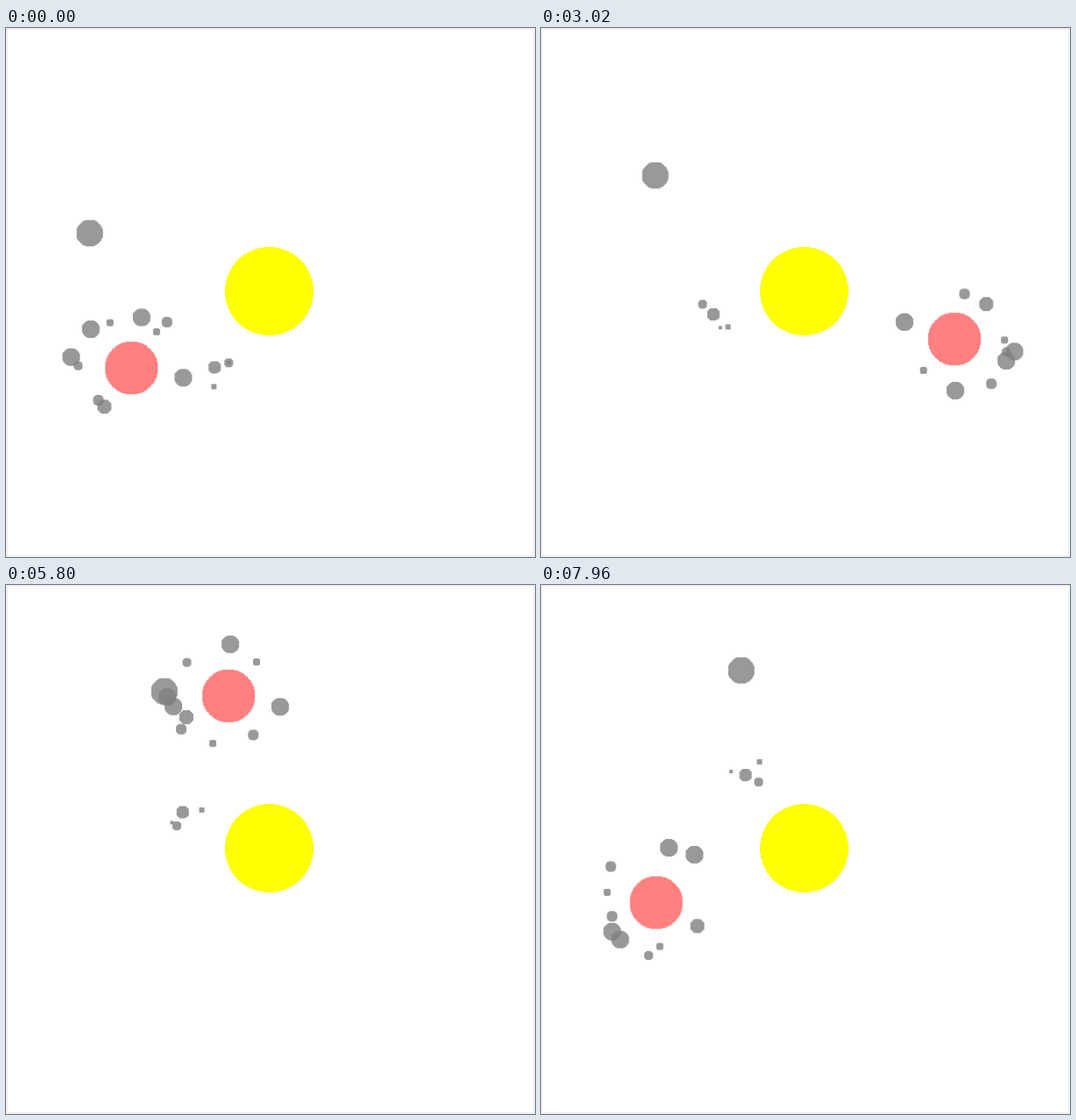
Recreate the animation shown at these times as an HTML page without scripts. Size 604x604 px, loop 7.99 s.

```html
<!DOCTYPE html>
<html lang="en">
<head>
<meta charset="utf-8">
<title>Orbits</title>
<style>
  html, body { margin: 0; width: 100%; height: 100%; overflow: hidden; background: #fff; }
  svg { display: block; width: 100%; height: 100%; shape-rendering: crispEdges; }

  /* --r orbit radius, --a start angle, --w turn in degrees per second */
  .orbit { animation: orbit 7.99s linear infinite; }
  @keyframes orbit {
    from {
      transform: rotate(var(--a)) translateX(var(--r)) rotate(calc(-1 * var(--a)));
    }
    to {
      transform: rotate(calc(var(--a) + 7.99 * var(--w))) translateX(var(--r))
                 rotate(calc(-1 * var(--a) - 7.99 * var(--w)));
    }
  }

  .rock { fill: #808080; fill-opacity: .8; }
  .planet { fill: #ff8080; }
  .sun { fill: #ff0; }
  .edge { fill: none; stroke: #f0f0f0; stroke-width: 2; }
</style>
</head>
<body>
<svg viewBox="0 0 604 604">
  <rect class="edge" x="1" y="1" width="602" height="602"/>
  <g transform="translate(300.5 300.5)">
    <circle class="sun" r="50.5"/>

    <!-- pink planet and its ten moons -->
    <g class="orbit" style="--r:180px; --a:150.9deg; --w:-44.1deg">
      <circle class="planet" r="30.5"/>
      <circle class="orbit rock" r="10.5" style="--r:70px; --a:-169.8deg; --w:60.1deg"/>
      <circle class="orbit rock" r="10.5" style="--r:64.2px; --a:-136.5deg; --w:52.7deg"/>
      <circle class="orbit rock" r="10.5" style="--r:60.2px; --a:10.6deg; --w:62.3deg"/>
      <circle class="orbit rock" r="10.5" style="--r:58.9px; --a:-78.6deg; --w:-63.7deg"/>
      <circle class="orbit rock" r="8.5" style="--r:54px; --a:125.1deg; --w:-57.2deg"/>
      <circle class="orbit rock" r="6.5" style="--r:52.8px; --a:135.8deg; --w:48.6deg"/>
      <circle class="orbit rock" r="6.5" style="--r:66.2px; --a:-52.3deg; --w:34deg"/>
      <circle class="orbit rock" r="5.5" style="--r:61px; --a:182.4deg; --w:-55.8deg"/>
      <circle class="orbit rock" r="4.5" style="--r:57.2px; --a:-115.5deg; --w:38.6deg"/>
      <circle class="orbit rock" r="4.5" style="--r:50.2px; --a:-55.4deg; --w:62.9deg"/>
    </g>

    <!-- outer planet -->
    <circle class="orbit rock" r="15.5" style="--r:215.3px; --a:-162.1deg; --w:6.61deg"/>

    <!-- inner planet and its three moons -->
    <g class="orbit" style="--r:107px; --a:125.6deg; --w:13.27deg">
      <circle class="rock" r="7.5"/>
      <circle class="orbit rock" r="5.5" style="--r:16.9px; --a:-17.6deg; --w:-39.5deg"/>
      <circle class="orbit rock" r="3.5" style="--r:22px; --a:92.2deg; --w:-17.06deg"/>
      <circle class="orbit rock" r="2.5" style="--r:17.1px; --a:-18.2deg; --w:26.6deg"/>
    </g>
  </g>
</svg>
</body>
</html>
```
